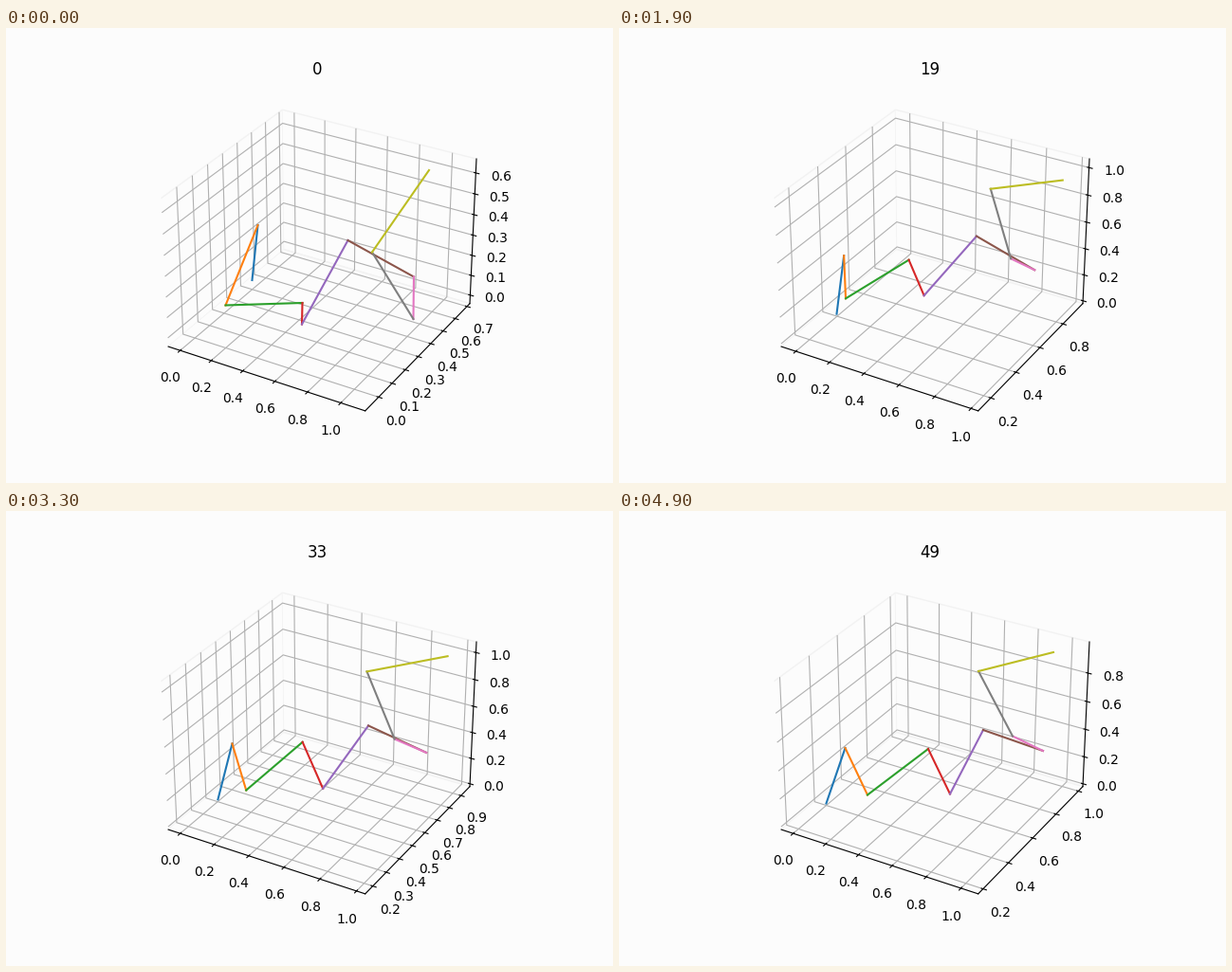
A matplotlib script that plays this animation: 640x480 px, repeating every 5 s.

```python
import numpy as np
import matplotlib.pyplot as plt
from matplotlib.animation import FuncAnimation
from matplotlib.lines import Line2D
from matplotlib.ticker import FixedLocator, MaxNLocator
from matplotlib.transforms import Affine2D

WIDTH, HEIGHT, DPI = 640, 480, 100
FRAMES, INTERVAL = 50, 100
BACKGROUND = "#fcfcfc"
PANE_EDGE = "#f2f2f2"
DATA_MARGINS = np.array([0.05, 0.05, 0])
BOX_MARGIN = 1 / 48

# Key poses: step, lowest x y z, highest x y z, joints in stage pixels.
POSES = [
    (0, (0, -0.045, -0.029), (1.067, 0.672, 0.652),
     [(259.5, 266), (265.5, 208), (231.5, 292.5), (312.5, 290), (312, 312.5),
      (360.5, 224), (430, 262.5), (429.5, 307), (386, 236.5), (446, 150)]),
    (8, (-0.035, 0.119, 0), (0.975, 0.947, 1),
     [(235, 300), (235.5, 235.5), (225, 276), (302, 248.5), (312, 271.5),
      (371.5, 213), (433.5, 255), (419.5, 245.5), (405, 170), (467.5, 168)]),
    (28, (0, 0.191, 0), (0.961, 0.904, 1.075),
     [(225, 303), (238.5, 244), (250.5, 293), (308.5, 241.5), (329.5, 291),
      (381.5, 225), (442, 255.5), (408, 241.5), (381, 169.5), (468, 154.5)]),
    (49, (0, 0.2185, 0), (1.023, 0.985, 0.9955),
     [(218.5, 308.5), (238.5, 250), (262, 299.5), (326, 251), (349, 298.5),
      (384, 231), (447, 253), (415, 237.5), (379, 169), (458, 149)]),
]
STEPS, LOWS, HIGHS, CHAINS = (np.array(part) for part in zip(*POSES))


def blend(keys, step):
    """Linear interpolation between the two key poses around a step."""
    i = min(np.searchsorted(STEPS, step, side="right"), len(STEPS) - 1)
    t = (step - STEPS[i - 1]) / (STEPS[i] - STEPS[i - 1])
    return keys[i - 1] * (1 - t) + keys[i] * t


def widen(low, high, margin):
    pad = (high - low) * margin
    return low - pad, high + pad


def round_ticks(low, high):
    locator = MaxNLocator(nbins=8, steps=[1, 2, 2.5, 5, 10])
    return [v for v in locator.tick_values(low, high)
            if low - 1e-9 <= v <= high + 1e-9]


fig = plt.figure(figsize=(WIDTH / DPI, HEIGHT / DPI), dpi=DPI,
                 facecolor=BACKGROUND)
ax = fig.add_subplot(projection="3d", facecolor=BACKGROUND)
axes3 = (ax.xaxis, ax.yaxis, ax.zaxis)
for axis in axes3:
    axis.set_pane_color(BACKGROUND)
    axis.pane.set_edgecolor(PANE_EDGE)
title = ax.set_title("0")

to_stage = Affine2D().scale(1, -1).translate(0, HEIGHT)
links = [fig.add_artist(Line2D([], [], color=f"C{i}", lw=1.5,
                               transform=to_stage))
         for i in range(CHAINS.shape[1] - 1)]


def update(step):
    lows, highs = widen(blend(LOWS, step), blend(HIGHS, step), DATA_MARGINS)
    setters = (ax.set_xlim, ax.set_ylim, ax.set_zlim)
    for axis, set_lim, low, high in zip(axes3, setters, lows, highs):
        set_lim(*widen(low, high, BOX_MARGIN))
        axis.set_major_locator(FixedLocator(round_ticks(low, high)))
    chain = blend(CHAINS, step)
    for link, a, b in zip(links, chain, chain[1:]):
        link.set_data(*zip(a, b))
    title.set_text(str(step))
    return links


anim = FuncAnimation(fig, update, frames=FRAMES, interval=INTERVAL,
                     init_func=lambda: update(0), repeat=True, repeat_delay=0)
plt.show()
```
